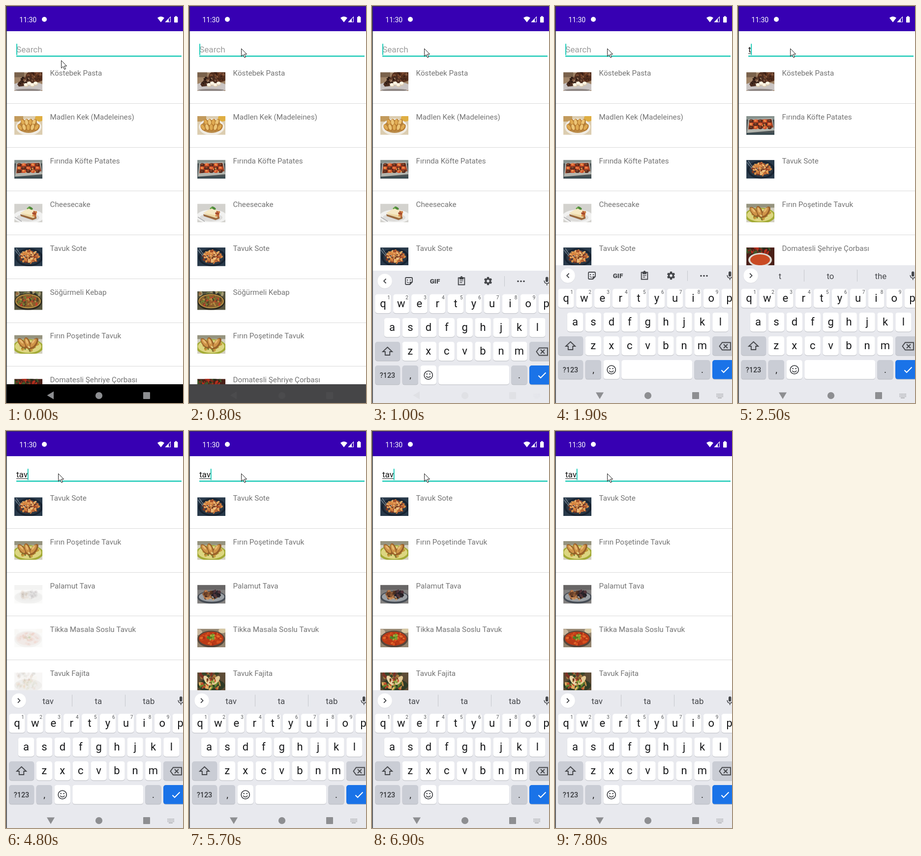
Animation, 360 px wide and 804 px high, one loop 8 s. Source, as an HTML page with a canvas:

```html
<!DOCTYPE html>
<html lang="tr">
<head>
<meta charset="utf-8">
<title>Recipe search</title>
<style>
  html, body { margin: 0; width: 100%; height: 100%; overflow: hidden; background: #fff; }
  canvas { display: block; width: 360px; height: 804px; }
</style>
</head>
<body>
<canvas id="stage"></canvas>
<script>
const W = 360, H = 804, LOOP = 8000, STEP = 100;
const ROW = 88.7, KEYS_TOP = 525, NAV_TOP = 766;
const BOARD = '#e8e9ee', INK = '#45474b', TEAL = '#17c9b5', EDGE = '#3c3f41';
const canvas = document.getElementById('stage');
const ratio = window.devicePixelRatio || 1;
canvas.width = W * ratio;
canvas.height = H * ratio;
const c = canvas.getContext('2d');

const clamp = (v, lo = 0, hi = 1) => Math.min(hi, Math.max(lo, v));
const smooth = v => v * v * (3 - 2 * v);

function box(x, y, w, h, color) {
  c.fillStyle = color;
  c.fillRect(x, y, w, h);
}
function round(x, y, w, h, r, color) {
  c.fillStyle = color;
  c.beginPath();
  c.roundRect(x, y, w, h, r);
  c.fill();
}
function oval(x, y, rx, ry, color, turn = 0) {
  c.fillStyle = color;
  c.beginPath();
  c.ellipse(x, y, rx, ry, turn, 0, 7);
  c.fill();
}
function fillPath(d, color) {
  c.fillStyle = color;
  c.fill(new Path2D(d));
}
function line(d, color = INK, width = 2) {
  c.strokeStyle = color;
  c.lineWidth = width;
  c.stroke(new Path2D(d));
}
function text(s, x, y, size, color, align = 'left', weight = 400) {
  c.font = `${weight} ${size}px Roboto, sans-serif`;
  c.textAlign = align;
  c.fillStyle = color;
  c.fillText(s, x, y);
}
function at(x, y, draw) {
  c.save();
  c.translate(x, y);
  draw();
  c.restore();
}

// Scatters n seeded specks of the given colours inside an ellipse.
function bits(x, y, rx, ry, n, size, colors, seed = 7) {
  const rnd = () => (seed = seed * 16807 % 2147483647) / 2147483647;
  for (let i = 0; i < 6; i++) rnd();
  for (let i = 0; i < n; i++) {
    const a = rnd() * 6.28, r = Math.sqrt(rnd());
    oval(x + rx * r * Math.cos(a), y + ry * r * Math.sin(a),
      size * (0.7 + rnd() * 0.6), size * (0.45 + rnd() * 0.4),
      colors[i % colors.length], rnd() * 3);
  }
}

// Thumbnails, 57 by 38 each.
const dishes = {
  'Köstebek Pasta'() {
    box(0, 0, 57, 38, '#a08468');
    box(0, 0, 20, 10, '#7a624c');
    oval(43, 8, 20, 12, '#54301f');
    bits(42, 8, 17, 10, 34, 2.5, ['#3b1f16', '#7c4b33', '#64381f', '#8b6248'], 5);
    oval(28, 30, 34, 11, '#c9c4c3');
    fillPath('M6 24L18 10L33 7L41 18L38 26L9 29Z', '#4b2d20');
    bits(23, 18, 15, 8, 36, 2.2, ['#2c1a12', '#7d553e', '#3b241a', '#a98a70'], 9);
    for (let i = 0; i < 4; i++) {
      oval(24 + i * 6.5, 26 - i % 2 * 3, 4.6, 4, '#d9c9b0');
      oval(23.5 + i * 6.5, 25 - i % 2 * 3, 3.8, 3, '#fbf4e4');
    }
    oval(28, 36, 26, 2.5, '#8d8582');
  },
  'Madlen Kek (Madeleines)'() {
    box(0, 0, 57, 38, '#dccdb0');
    box(0, 0, 18, 11, '#c29a5c');
    oval(51, 4, 9, 7, '#dfae42');
    oval(29, 22, 26, 17, '#f0ece4');
    oval(29, 21, 21, 13, '#b98a48');
    for (let i = 0; i < 9; i++) {
      const x = i < 4 ? 18 + i * 7.5 : 12 + (i - 4) * 8.5, y = i < 4 ? 13 : 23;
      const turn = (x - 29) / 30;
      oval(x, y, 4.6, 7.6, '#b57a30', turn);
      oval(x - 0.7, y - 0.6, 3.2, 6, i % 2 ? '#ecc577' : '#dfaa52', turn);
    }
  },
  'Fırında Köfte Patates'() {
    box(0, 0, 57, 38, '#4c5456');
    box(0, 0, 57, 7, '#87928e');
    fillPath('M4 6L53 4L57 29L1 34Z', '#b3b5ae');
    fillPath('M6 8L51 6L55 23L4 27Z', '#8f3a20');
    for (let i = 0; i < 15; i++) {
      const x = 10 + i % 5 * 9.3, y = 10 + Math.floor(i / 5) * 6.5;
      oval(x, y, 4.4, 3.4, i % 2 ? '#d8562c' : '#54291c');
      oval(x - 0.8, y - 1, 2.5, 1.6, i % 2 ? '#ee8f4e' : '#8a4a30');
    }
    bits(29, 18, 23, 9, 20, 1.7, ['#e5a050', '#b93920', '#341c16'], 8);
    box(0, 34, 57, 4, '#394a50');
  },
  'Cheesecake'() {
    box(0, 0, 57, 38, '#d3d2ce');
    oval(29, 26, 31, 14, '#f1f1f0');
    oval(28, 28, 23, 8, '#dddcda');
    fillPath('M12 19L29 9L45 15L45 28L38 31Z', '#ecd6a2');
    fillPath('M12 19L29 9L45 15L36 23Z', '#f6e9c5');
    fillPath('M12 21L38 29L45 26V30L37 33L13 25Z', '#9a6a3e');
    bits(41, 20, 4, 6, 12, 2.6, ['#b9653a', '#d98f4d', '#a5482c'], 4);
    oval(33, 9, 5, 2.4, '#4e8a3a', 0.5);
    oval(28, 9, 3, 1.6, '#6aa84c', -0.5);
    line('M1 27L15 36', '#a9a9aa', 1.3);
  },
  'Tavuk Sote'() {
    box(0, 0, 57, 38, '#28394a');
    oval(30, 20, 28, 18, '#172230');
    oval(30, 20, 24, 15, '#2a3744');
    bits(30, 19, 19, 12, 90, 3.2, ['#d98b43', '#a64f29', '#edb76f', '#c8743a', '#7d3822', '#e6a35a'], 6);
    line('M4 2L13 15M1 5L11 17', '#7f8d99', 1.2);
    bits(30, 18, 16, 9, 22, 1.4, ['#f3d7a1', '#b93b20', '#f0c583', '#5b3a20'], 2);
  },
  'Söğürmeli Kebap'() {
    box(0, 0, 57, 38, '#55543f');
    bits(28, 4, 28, 5, 24, 4, ['#76814f', '#33352b', '#96693e', '#a49a72'], 3);
    oval(28, 21, 28, 17, '#2c2820');
    oval(28, 20, 26, 14.5, '#b79446');
    oval(28, 20, 24, 12.5, '#87602e');
    bits(28, 20, 21, 11, 52, 2.7, ['#5b4526', '#b58a40', '#6f8436', '#995a2c', '#c1432b', '#4d3a22'], 11);
  },
  'Fırın Poşetinde Tavuk'() {
    box(0, 0, 57, 38, '#d3d0c0');
    box(0, 0, 57, 8, '#96947f');
    oval(28, 24, 31, 16, '#a3ab36');
    oval(28, 23, 27, 13, '#dcd680');
    bits(28, 22, 20, 9, 24, 4, ['#c59b3b', '#a8762c', '#d6b252', '#8b5a20'], 4);
    for (const [x, turn] of [[16, -0.7], [27, -0.35], [40, 0.6]]) {
      oval(x, 17, 6, 13, '#98602a', turn);
      oval(x - 1, 16, 4, 10, '#cf9448', turn);
      oval(x - 1.5, 13, 2, 5, '#e7b970', turn);
    }
    bits(29, 28, 17, 5, 14, 1.8, ['#748331', '#e9d48a', '#a06425'], 13);
  },
  'Domatesli Şehriye Çorbası'() {
    box(0, 0, 57, 38, '#4a2018');
    bits(28, 6, 28, 7, 40, 3.5, ['#b52d1c', '#2e2a1d', '#7b2a1c', '#3f5a2b'], 5);
    oval(28, 25, 24, 14, '#dedad2');
    oval(28, 25, 20, 11, '#c94a23');
  },
  'Çıtır Yumurta'() {
    box(0, 0, 57, 38, '#6f6a50');
    bits(28, 5, 28, 5, 18, 4, ['#48603a', '#8f3d2b', '#3d4932'], 6);
    oval(28, 24, 27, 15, '#e4dccb');
    oval(28, 24, 22, 11, '#cbbd9f');
    oval(19, 22, 9, 7, '#bd7a2c', -0.5);
    oval(18, 20, 7, 5, '#dfa049', -0.5);
    oval(39, 22, 9, 8, '#b66f25', 0.5);
    oval(38, 20, 7, 5, '#e2ad58', 0.5);
    oval(28, 24, 6, 8, '#d59a43');
    oval(29, 21, 3, 4, '#f3e3b8');
  },
  'Palamut Tava'() {
    box(0, 0, 57, 38, '#82807f');
    box(0, 0, 57, 10, '#686666');
    oval(29, 25, 29, 13, '#474d55');
    oval(29, 24, 26, 10, '#9a9fa4');
    bits(22, 20, 11, 7, 22, 4, ['#6b4128', '#b8794a', '#4a2d20', '#8d5a36'], 7);
    bits(39, 19, 9, 7, 20, 3.5, ['#2c252c', '#50343a', '#1d1b20'], 10);
    bits(28, 27, 13, 3, 10, 2, ['#d19a64', '#76502f'], 4);
  },
  'Tikka Masala Soslu Tavuk'() {
    box(0, 0, 57, 38, '#93846f');
    oval(51, 4, 8, 5, '#d6c7a2');
    oval(3, 7, 7, 6, '#c7b59d');
    oval(28, 21, 28, 17, '#57463b');
    oval(28, 20, 25, 14, '#bb3a17');
    bits(28, 20, 22, 12, 34, 3.4, ['#d8511f', '#a92e15', '#e36a2b', '#c74219'], 12);
    bits(28, 17, 8, 6, 24, 2.4, ['#6f9a2c', '#9abc42', '#4d7a23'], 8);
  },
  'Tavuk Fajita'() {
    box(0, 0, 57, 38, '#5d4c36');
    bits(28, 6, 27, 6, 18, 4, ['#a7793d', '#38472b', '#7d3123'], 9);
    oval(28, 26, 28, 13, '#2f3a26');
    bits(28, 24, 24, 10, 46, 3.4, ['#6d8a2f', '#c4452a', '#b98a45', '#48692a', '#e0b063'], 5);
    oval(20, 16, 5, 11, '#ead5a6', -0.6);
    oval(38, 16, 5, 11, '#e5cb94', 0.7);
    bits(28, 15, 10, 6, 18, 2.4, ['#cc512f', '#87a63b', '#7a3b24'], 3);
  }
};

const names = Object.keys(dishes);
const pick = (...ids) => ids.map(i => names[i]);
const results = {
  '': names.slice(0, 8),
  t: pick(0, 2, 4, 6, 7),
  ta: pick(0, 2, 4, 6, 8),
  tav: pick(4, 6, 9, 10, 11)
};
const hints = { t: ['t', 'to', 'the'], ta: ['ta', 'ya', 'take'], tav: ['tav', 'ta', 'tab'] };
const typed = t => t < 2200 ? '' : t < 3100 ? 't' : t < 4500 ? 'ta' : 'tav';

const caretOff = [[100, 600], [1400, 1900], [2900, 3100], [3800, 4300],
  [5200, 5700], [6200, 6900], [7300, 7800]];

// Dishes not seen before fade in once loaded.
function thumbAlpha(name, t) {
  const i = names.indexOf(name);
  if (i < 8) return 1;
  if (i === 8) return clamp((t - 3200) / 200);
  return clamp((t - 4780) / 480);
}

function drawList(t) {
  c.save();
  c.beginPath();
  c.rect(0, 51, W, (t < 900 ? NAV_TOP : KEYS_TOP) - 51);
  c.clip();
  results[typed(t - 100)].forEach((name, i) => {
    const y = i * ROW;
    at(17, 134.3 + y, () => {
      c.beginPath();
      c.rect(0, 0, 57, 37.7);
      c.clip();
      c.globalAlpha = thumbAlpha(name, t);
      dishes[name]();
    });
    text(name, 89.6, 141.2 + y, 15.2, '#747474');
    box(0, Math.round(197 + y), W, 1, '#dadada');
  });
  c.restore();
}

function drawStatus() {
  box(0, 0, W, 51, '#3700b3');
  text('11:30', 27.3, 32.8, 14, '#fff');
  oval(78, 27, 5, 5, '#fff');
  fillPath('M308 24Q315 18.5 322 24L315 33Z', '#fff');
  line('M324.5 32.3L334.5 22V32.3Z', '#fff', 1.1);
  fillPath('M324 33L331 25.7V33Z', '#fff');
  round(342, 22, 7.4, 11.5, 1, '#fff');
  box(344, 20.5, 3.4, 2, '#fff');
}

function drawSearch(t) {
  const word = typed(t);
  box(21, 100.4, 336, 2.4, TEAL);
  if (word) {
    text(word, 21, 94.3, 17.2, '#111');
    box(21, 96, c.measureText(word).width, 1, '#222');
  } else {
    text('Search', 21, 94.3, 17.2, '#9c9c9c');
  }
  if (!caretOff.some(([a, b]) => t >= a && t < b)) {
    const x = word ? 20.6 + c.measureText(word).width : 21;
    box(x, 76.5, 1.9, 22.8, TEAL);
  }
}

function key(x, y, w, color = '#fff') {
  round(x, y + 1, w, 38.5, 5, '#b9bbc1');
  round(x, y, w, 38.5, 5, color);
}

function drawTools() {
  line('M28.5 541.5L24 546L28.5 550.5', INK, 1.8);
  at(75, 546, () => {
    line('M-5.5 -7H5.5Q7 -7 7 -5.5V2L2 7H-5.5Q-7 7 -7 5.5V-5.5Q-7 -7 -5.5 -7Z', INK, 1.8);
    fillPath('M1.5 7V1.5H7Z', INK);
    oval(-3, -2, 1.2, 1.2, INK);
    oval(3, -2, 1.2, 1.2, INK);
    line('M-4 1.3Q-2 4 0 3.4', INK, 1.4);
  });
  text('GIF', 128, 550.6, 13.5, INK, 'center', 900);
  at(182, 546, () => {
    line('M-6.3 -6.5H6.3V7.5H-6.3Z', INK, 1.9);
    round(-4, -8, 8, 5, 1, INK);
    oval(0, -8, 2, 2, INK);
    line('M-3.5 -0.5H3.5M-3.5 3H1.5', INK, 1.5);
  });
  at(236, 546, () => {
    for (let i = 0; i < 6; i++) {
      c.rotate(Math.PI / 3);
      round(-2.2, -8.2, 4.4, 5, 1, INK);
    }
    oval(0, 0, 6.2, 6.2, INK);
    oval(0, 0, 2.7, 2.7, BOARD);
  });
  box(269, 536, 1, 21, '#c6c8cd');
  for (let i = -1; i < 2; i++) oval(303 + i * 6, 546.5, 1.8, 1.8, INK);
}

function drawHints(words) {
  line('M24 541.5L28.5 546L24 550.5', INK, 1.8);
  words.forEach((w, i) => text(w, 85.5 + i * 102.4, 552.6, 16.8, INK, 'center'));
  box(134, 534, 1, 24, '#c6c8cd');
  box(242, 534, 1, 24, '#c6c8cd');
}

function drawKeyboard(t) {
  box(0, KEYS_TOP, W, 300, BOARD);
  oval(26, 546.6, 15, 15, '#d3d5da');
  oval(26, 546, 14.8, 14.8, '#fff');
  const words = hints[typed(t - 100)];
  words ? drawHints(words) : drawTools();
  round(353, 537.5, 5.4, 10.5, 2.7, INK);
  line('M350.3 545Q350.5 551 355.7 551Q361 551 361 545M355.7 551V555', INK, 1.6);

  const pitch = 36.93, gray = '#cacdd5';
  const rowY = r => 572.8 + r * 48.1;
  ['qwertyuiop', 'asdfghjkl', 'zxcvbnm'].forEach((row, r) => {
    const first = [22.4, 41, 77.8][r], y = rowY(r);
    [...row].forEach((ch, i) => {
      const x = first + i * pitch;
      key(x - 16.2, y, 32.4);
      text(ch, x, y + 26.2, 22, '#17181a', 'center');
      if (!r) text((i + 1) % 10, x + 11.7, y + 10.6, 10, '#55575b', 'center');
    });
  });
  const y3 = rowY(2), y4 = rowY(3);
  key(6.2, y3, 51, gray);
  line('M31.5 680L41 689H36.2V696H26.8V689H22Z', INK, 1.9);
  key(320, y3, 51, gray);
  line('M340 681.5H357V696.5H340L334.5 689Z', INK, 1.9);
  line('M343 685L351 693M351 685L343 693', INK, 1.9);

  key(6.2, y4, 51, gray);
  text('?123', 31.5, 742, 14.3, '#36383c', 'center', 500);
  key(61.6, y4, 32.4, gray);
  text(',', 78, 743, 19, '#222', 'center');
  key(98.5, y4, 32.4);
  at(114.7, 736.7, () => {
    c.beginPath();
    c.arc(0, 0, 8.5, 0, 7);
    c.strokeStyle = INK;
    c.lineWidth = 1.8;
    c.stroke();
    oval(-3, -2.4, 1.3, 1.3, INK);
    oval(3, -2.4, 1.3, 1.3, INK);
    line('M-4.3 1.7Q-2.8 4.6 0 4.6Q2.8 4.6 4.3 1.7', INK, 1.6);
  });
  key(135.2, y4, 144);
  key(283.2, y4, 32.4, gray);
  text('.', 299.5, 743, 19, '#222', 'center');
  key(320, y4, 51, '#1a73e8');
  line('M338.5 737.5L343 742L353.5 731.5', '#fff', 2);
}

function drawNav(t) {
  const gray = '#8d8e91';
  const shown = t < 800 ? 1 : clamp((t - 950) / 550, 0.09, 1);
  const turn = t < 1000 ? 0 : smooth(clamp((t - 1000) / 400));
  c.save();
  c.globalAlpha = shown;
  at(91, 788.5, () => {
    c.rotate(-turn * Math.PI / 2);
    fillPath('M-7.5 0L6 -8V8Z', gray);
  });
  oval(189, 789, 7.1, 7.1, gray);
  round(279, 782, 14, 14, 1, gray);
  if (t >= 900) {
    c.globalAlpha = shown * 0.75;
    for (let r = 0; r < 3; r++)
      for (let i = 0; i < 6; i++) box(328.5 + i * 2.4, 785 + r * 2.7, 1.5, 1.5, gray);
    box(331, 793, 8, 1.4, gray);
  }
  c.restore();
}

function drawPointer(t) {
  const p = smooth(clamp(t / 550));
  at(112.5 - 6 * p, 110.3 - 24 * p, () => {
    const d = 'M0 0V15.6L3.7 12.2L6.3 18.2L8.8 17.1L6.2 11.3H11Z';
    fillPath(d, '#fff');
    line(d, '#1c1c1c', 1);
  });
}

function draw(t) {
  c.setTransform(ratio, 0, 0, ratio, 0, 0);
  box(0, 0, W, H, '#fff');
  drawList(t);
  drawStatus();
  drawSearch(t);
  const light = t < 800 ? 0 : clamp((t - 740) / 200);
  box(0, NAV_TOP, W, H - NAV_TOP, light ? BOARD : '#000');
  if (t >= 800) {
    const drop = t < 1200 ? 11 * 5.2 ** ((1000 - t) / 100) : 0;
    at(0, drop, () => drawKeyboard(t));
    box(0, NAV_TOP, W, H - NAV_TOP, `rgba(0,0,0,${1 - light})`);
  }
  drawNav(t);
  box(0, 0, W, 1, EDGE);
  box(0, 0, 1.6, H, EDGE);
  drawPointer(t);
}

const start = performance.now();
function tick() {
  const t = (performance.now() - start) % LOOP;
  draw(Math.floor((t + 1) / STEP) * STEP % LOOP);
  requestAnimationFrame(tick);
}
tick();
</script>
</body>
</html>
```
